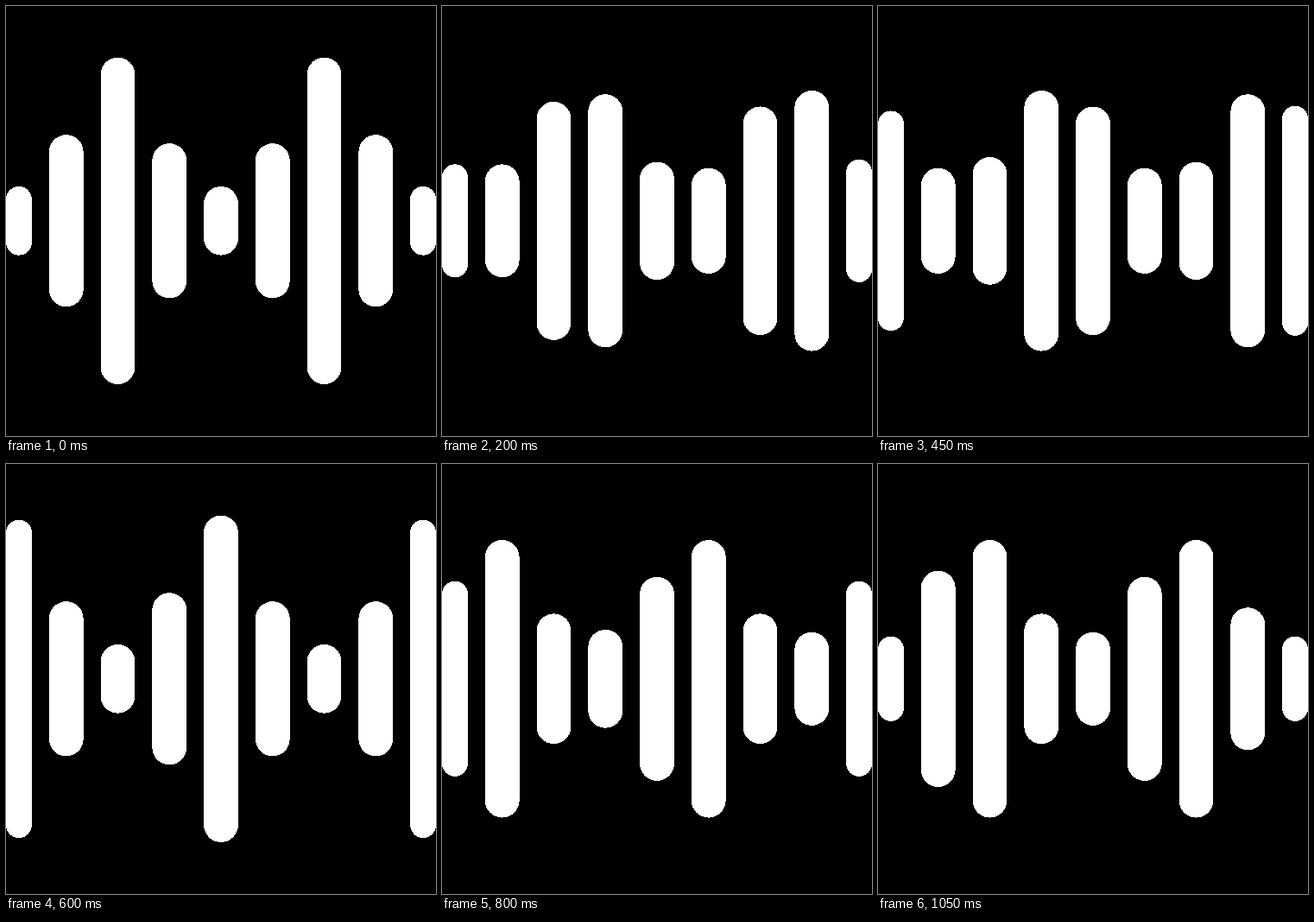
An HTML page that plays this animation: 498 by 498 pixels, repeating every 1100 ms.

```html
<!DOCTYPE html>
<html lang="en">
<head>
<meta charset="utf-8">
<title>Sound bars</title>
<style>
  html, body { margin: 0; width: 100%; height: 100%; overflow: hidden; background: #000; }
  svg { display: block; width: 100%; height: 100%; fill: #fff; shape-rendering: crispEdges; }
</style>
</head>
<body>
<svg id="stage" viewBox="0 0 25 25"></svg>
<script>
const LOOP = 1100;
const TICK = 50;
const SPAN = 7;             // motion steps from one key pose to the next
const COUNT = 9;
const SIZE = 25;
const MID = 12.49;
const WAVE = [4, 9, 19, 9]; // one wavelength, four bars long

const stage = document.getElementById('stage');

function setAttrs(el, attrs) {
  for (const name in attrs) el.setAttribute(name, attrs[name]);
}

function makeBar(_, i) {
  const rect = document.createElementNS('http://www.w3.org/2000/svg', 'rect');
  const left = Math.max(0, i * 3 - 0.5);
  const right = Math.min(SIZE, i * 3 + 1.5);
  const radius = (right - left) / 2;
  setAttrs(rect, { x: left, width: right - left, rx: radius, ry: radius });
  stage.append(rect);
  return rect;
}

// The wave moves one bar to the right with every key pose.
function keyHeight(bar, pose) {
  const phase = pose % 4;
  const base = WAVE[(bar - phase + 4) % 4];
  const shoulder = phase < 3 && Math.abs(bar - phase - 4) === 3;
  const trimmed = pose > 0 && bar % (COUNT - 1) === 0;
  return base + (shoulder ? 1 : 0) - (trimmed ? 0.5 : 0);
}

function heightAt(bar, step) {
  const pose = Math.floor(step / SPAN);
  const from = keyHeight(bar, pose);
  const to = keyHeight(bar, pose + 1);
  return from + (to - from) * (step % SPAN) / SPAN;
}

// Even steps at first, then one step is skipped on every third tick.
function stepAt(time) {
  const tick = Math.floor((time % LOOP) / TICK);
  return tick + Math.max(0, Math.floor((tick - 5) / 3));
}

const bars = Array.from({ length: COUNT }, makeBar);

function draw() {
  const step = stepAt(performance.now());
  bars.forEach((rect, i) => {
    const height = heightAt(i, step);
    setAttrs(rect, { y: MID - height / 2, height });
  });
  requestAnimationFrame(draw);
}

draw();
</script>
</body>
</html>
```
